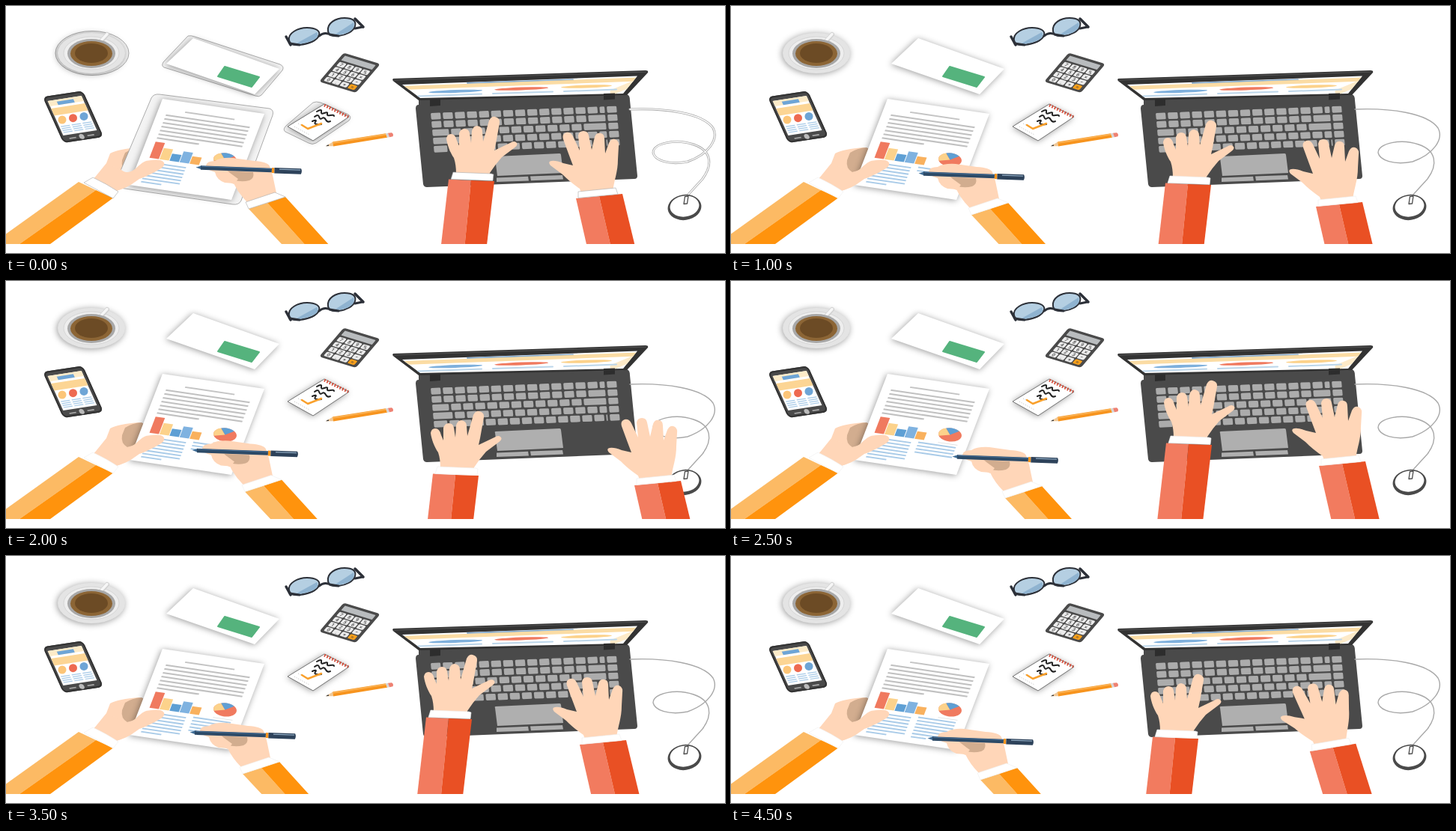
An HTML page that plays this animation: 960 px wide and 330 px high, repeating every 5000 ms.

```html
<!DOCTYPE html>
<html lang="en">
<head>
<meta charset="utf-8">
<title>Desk work</title>
<style>
html, body { margin: 0; width: 100%; height: 100%; overflow: hidden; background: #fff; }
svg { display: block; width: 960px; height: 330px; }
.skin { fill: #ffd6b8; }
.shade { fill: #d2ad8f; }
.cuff { fill: #fff; stroke: #eee; stroke-width: .6; }
.orange { fill: #ff930d; }
.peach { fill: #fcba64; }
.red { fill: #e95024; }
.coral { fill: #f27b5f; }
.shadow { filter: drop-shadow(-1px 1px 4px #0006); }
.halo { display: none; fill: #f3f3f3; stroke: #999; stroke-width: .8; stroke-linejoin: round; }
.core { display: none; }
.rough .halo, .rough .core { display: inline; }
.rough .cuff { stroke: #aaa; }
.rough .cable { stroke-width: 3; }
.line { fill: none; stroke-linecap: round; stroke-linejoin: round; }
text { font: 500 6.5px Roboto, Arial, sans-serif; fill: #444; text-anchor: middle; }
</style>
</head>
<body>
<svg id="stage" viewBox="0 0 960 330">
  <defs>
    <clipPath id="screen"><path d="M529 105 843 93.5 824 117 553 123Z"/></clipPath>
    <path id="cable" d="M833 138C880 136 930 143 944 163 952 178 938 198 910 208 885 213 866 206 864 196 864 183 895 177 918 185 942 193 944 212 930 231L909 254"/>
  </defs>

  <g id="coffee">
    <ellipse class="halo" cx="115" cy="63" rx="49" ry="29.5"/>
    <g class="shadow">
      <ellipse cx="114" cy="63" rx="45" ry="27" fill="#e4e4e4"/>
    </g>
    <ellipse cx="114" cy="63" rx="37" ry="22" fill="#eee" stroke="#d6d6d6"/>
    <path class="line" d="M127 47 135 38" stroke="#d2d2d2" stroke-width="6"/>
    <path class="line" d="M127 46 135 37.5" stroke="#f6f6f6" stroke-width="3.5"/>
    <ellipse cx="114" cy="63.5" rx="32" ry="19.5" fill="#a8a8a8"/>
    <ellipse cx="114" cy="63.5" rx="28" ry="16.5" fill="#8c6535"/>
    <ellipse cx="114" cy="63" rx="22" ry="13" fill="#6c4b25"/>
  </g>

  <g id="phone" transform="matrix(1 -.154 .45 1 49 121.5)">
    <rect width="53.5" height="61.5" rx="6" fill="#4a4a4a"/>
    <rect x="1" y="1" width="51.5" height="59.5" rx="5" fill="none" stroke="#333" stroke-width="2"/>
    <rect x="4" y="6" width="45" height="46" fill="#fff"/>
    <path d="M4 6h45v7h-45z" fill="#fdebc8"/>
    <path d="M15 8.5h22v4.5h-22z" fill="#6ea5d6"/>
    <path d="M4 16h45v9.5h-45z" fill="#fcd594"/>
    <circle cx="26.5" cy="57" r="3.3" fill="#bbb"/>
    <path d="M10 57h9M34 57h9" stroke="#aaa" stroke-width="1.6"/>
  </g>
  <g id="phone-dots"/>

  <g id="envelope">
    <path class="halo" d="M243 40Q247 39 252 41L366 78Q372 81 369 86L341 119Q338 122 333 120L211 82Q207 80 210 75Z"/>
    <path class="shadow" d="M250 43 365 84 332 118 214 77Z" fill="#fff"/>
    <path d="M292 81 338 95 328 108 283 94Z" fill="#55b37d" stroke="#55b37d" stroke-width="2" stroke-linejoin="round"/>
  </g>

  <g id="glasses" stroke="#2c3038">
    <path class="line" d="M374 41 380 52M466 17 477 28" stroke-width="3.5"/>
    <path d="M378 46C376 36 390 29 402 29 413 29 420 33 418 39 416 46 404 51 392 52 383 53 379 51 378 46Z" fill="#b5cfe2" stroke-width="2"/>
    <path d="M430 34C428 23 440 16 452 16 463 16 468 20 466 27 464 34 454 39 444 40 435 41 431 39 430 34Z" fill="#b5cfe2" stroke-width="2"/>
    <path d="M386 51 415 35Q420 43 404 48 394 51 386 51ZM437 39.500 464 22Q467 31 455 36 446 39 437 39.500Z" fill="#8fb3d0" stroke="none"/>
    <path class="line" d="M418 40Q424 35 430 37M379 50 392 52M432 38 444 40M466 30 476 28" stroke-width="3"/>
  </g>

  <g id="calculator" transform="matrix(.98 .3 -.66 .77 451 62.5)">
    <rect width="50" height="50" rx="4" fill="#4a4a4a"/>
    <rect x="4" y="3.5" width="42" height="8" rx="1" fill="#b9bcbe"/>
  </g>

  <g id="notepad">
    <path class="halo" d="M410 129Q414 127 420 129L457 145Q462 148 458 153L414 183Q409 186 404 183L373 168Q369 165 374 160Z"/>
    <path class="shadow" d="M425 131 458 148 410 180 376 161Z" fill="#fff"/>
    <path d="M425 131 458 148 410 180 376 161Z" fill="none" stroke="#555" stroke-width=".8"/>
    <path d="M425 132.500 457 148" stroke="#d6503c" stroke-width="4" stroke-dasharray="1.8 2"/>
    <path class="line" d="M415 141Q422 137 421 141T425 143 429 144 433 146 438 147M412 148Q417 144 418 148T422 150 427 152 433 154M409 154Q416 151 413 155T421 158" stroke="#222" stroke-width="2"/>
    <path class="line" d="M395 159 403 164 421 157" stroke="#f9a02c" stroke-width="2.5"/>
    <path d="M385 161 405 172M390 157 394 159" stroke="#bbb" stroke-dasharray="1 2"/>
  </g>

  <g id="pencil" transform="translate(0 -.7)">
    <path d="M427 188 436 182.5 437 188Z" fill="#efc99a"/>
    <path d="M427 188 430.5 185.8 431 187.6Z" fill="#333"/>
    <path d="M436 182.3 507 171 509 176.5 437 188.2Z" fill="#f7941e"/>
    <path d="M436 183.6 507 172.2" stroke="#fbb65b" stroke-width="1.5"/>
    <path d="M507 171 510 170.5 512 176 509 176.5Z" fill="#d5d5d5"/>
    <path d="M510 170.5 515 170Q518 172 516.5 175L512 176Z" fill="#ee8172"/>
  </g>

  <g id="laptop">
    <path d="M551 125 829 118Q833 119 833 126L843 227Q843 231 839 231L562 242Q558 242 557 238L547 137Q547 132 551 132Z" fill="#4a4a4a"/>
    <path d="M517 97Q515 99 518 101L551 126 829 119 857 89Q858 86 854 86Z" fill="#333"/>
    <path d="M518 99 855 88" stroke="#555"/>
    <g clip-path="url(#screen)" class="line">
      <path d="M520 90h340v40h-340z" fill="#fff"/>
      <path d="M616 103 757 98.5" stroke="#80a9d0" stroke-width="2"/>
      <path d="M530 109.5 846 98" stroke="#fbdca4" stroke-width="5"/>
      <path d="M810 115 846 100" stroke="#fdeac8" stroke-width="7"/>
      <path d="M550 120.5 635 117.5M650 117 730 114.5M745 114 815 111.5" stroke="#bcd6ea" stroke-width="2"/>
      <ellipse cx="600" cy="114" rx="36" ry="2" fill="#7fb0dc" transform="rotate(-2 600 114)"/>
      <ellipse cx="688" cy="110.5" rx="36" ry="2" fill="#f07a5f" transform="rotate(-2 688 110.5)"/>
      <ellipse cx="775" cy="107.5" rx="34" ry="2" fill="#fcd28b" transform="rotate(-2 775 107.5)"/>
    </g>
    <path d="M566 125 580 124.5 580 133 566 134ZM798 117 813 116.5 813 124.5 798 125.5Z" fill="#2d2d2d"/>
    <g id="keys" transform="matrix(1 -.038 .09 1 567 143)" fill="#acacac"/>
    <path d="M654 201 739 197Q741 197 741 199L744 223 656 227 653 203Q652 201 654 201ZM655 229.5 697 227.8 698 233.5 655 235ZM700 227.6 743 226 744 231.5 701 233.3Z" fill="#afafaf"/>
  </g>

  <g id="mouse" class="line">
    <use href="#cable" class="cable" stroke="#a9a9a9" stroke-width="1.4"/>
    <use href="#cable" class="core" stroke="#fff" stroke-width="1.3"/>
    <ellipse cx="906" cy="269" rx="22.5" ry="17" fill="#4a4a4a" transform="rotate(-8 906 269)"/>
    <ellipse cx="906" cy="267.5" rx="19.5" ry="14" fill="#fff" transform="rotate(-8 906 267.5)"/>
    <path d="M906.5 254.5 911 254 909.5 264 905 264.5Z" stroke="#4a4a4a" stroke-width="1.3"/>
  </g>

  <g id="holding-fingers">
    <path class="skin" d="M117 231 134 210 139 197Q150 191 178 189L186 192 172 230 148 247Z"/>
    <path class="shade" d="M155 206 159 196Q168 190 181 189L186 192 174 218 162 222Q153 217 155 206Z"/>
  </g>

  <path class="halo" d="M194 123Q197 117 205 118L352 137Q358 139 356 146L314 260Q311 266 303 265L152 243Q144 241 147 234Z"/>
  <path class="shadow" d="M209 124 345 144 301 259 164.5 239Z" fill="#fff"/>
  <g id="page" transform="matrix(1 .147 -.383 1 209 124)">
    <path d="M35 12.7h66" stroke="#c4c4c4" stroke-width="1.8"/>
  </g>
  <g id="pie" transform="translate(292.5 205.5) rotate(6) scale(15.5 9)">
    <circle r="1" fill="#f07a5f"/>
    <path d="M0 0-.95 .3A1 1 0 0 1-.4-.92Z" fill="#fcd28b"/>
    <path d="M0 0-.4-.92A1 1 0 0 1 .75-.66Z" fill="#5e9fd4"/>
  </g>

  <g id="holding-arm">
    <path class="peach" d="M97 235 120 246 18 318 0 318 0 304.5Z"/>
    <path class="orange" d="M120 246 143 256.5 59 318 18 318Z"/>
    <path class="skin" d="M117 231 135 212 152 217C158 224 165 223 172 218 180 211 184 207 190 206.5Q206 204 210 208 214 212 207 217C200 221 190 227 178 231 170 237 160 244 147 247Z"/>
    <path class="cuff" d="M116 229Q135 238 150 248L143 257 104 236Z"/>
  </g>

  <g id="writer">
    <path class="peach" d="M321 279 346 271 408 340 378 340Z"/>
    <path class="orange" d="M346 271 370 263 440 340 408 340Z"/>
    <path class="skin" d="M264 221Q265 215 276 215 284 210 300 211L328 215Q346 216 349 222L353 234 358 258 319 270Q307 258 301 245L289 244Q278 240 276 230 264 227 264 221Z"/>
    <path class="shade" d="M288 228 327 230Q329 238 322 241 310 244 301 240Z"/>
    <path class="skin" d="M275 223 286 222Q295 231 307 239L301 246 287 239Q276 231 275 223Z"/>
    <path class="cuff" d="M317 270 356 257 370 263 321 279Z"/>
    <g transform="translate(248 223.5) rotate(2.1)">
      <path d="M2.5 0 10-2.5V2.5Z" fill="#3f6d96"/>
      <path d="M9-2.5H104V3H9Z" fill="#2c4a67"/>
      <path d="M10-1.5H104" stroke="#4a7299"/>
      <path d="M104-3.2h3.5v7h-3.5z" fill="#f7941e"/>
      <path d="M107.5-3.5H143Q145 0 143 4H107.5Z" fill="#2d425a"/>
      <path d="M114-1.5H142" stroke="#8fa9c0" stroke-width="1.2"/>
    </g>
  </g>

  <g id="left-hand">
    <path class="coral" d="M591 231.5 621 233 610 345 578 345Z"/>
    <path class="red" d="M621 233 652 234 639 345 610 345Z"/>
    <path class="skin" d="M601 224Q601 212 598 203C593 196 589 185 588 177Q589 171 594 171 600 171 602 180L605 187 605 170Q607 164 612 164 618 164 619 170L621 183 622 167Q624 160 629 160 636 161 636 168L637 181 645 153Q648 147 653 148 660 150 659 156L654 184 652 193 673 183Q679 179 682 183 684 186 678 190L662 202Q653 212 646 223L645 230Z"/>
    <path class="cuff" d="M597 222 648 224 651 225 650 233.5 594 231.5Z"/>
  </g>

  <g id="right-hand">
    <path class="coral" d="M761 257 792 254 820 375 788 375Z"/>
    <path class="red" d="M792 254 823 251 853 375 820 375Z"/>
    <path class="skin" d="M768 250 766 244C757 238 749 231 743 225L727 213Q723 208 728 207 734 206 744 210L757 213Q752 200 744 178 742 171 748 169 754 168 757 174L766 193 764 173Q765 167 771 167 777 167 778 173L782 192 786 175Q788 169 794 170 799 171 799 177L800 197 805 183Q808 177 813 178 819 180 818 187L817 205C817 222 812 232 810 248Z"/>
    <path class="cuff" d="M764 248 814 243 817 251.5 764 256.5Z"/>
  </g>

  <path d="M0 318h960v12H0z" fill="#fff"/>
</svg>
<script>
const $ = id => document.getElementById(id);

function add(parent, tag, attrs, label) {
  const node = document.createElementNS("http://www.w3.org/2000/svg", tag);
  for (const name in attrs) node.setAttribute(name, attrs[name]);
  if (label) node.textContent = label;
  parent.append(node);
  return node;
}
const rect = (parent, x, y, width, height, fill, rx = 0) =>
  add(parent, "rect", { x, y, width, height, rx, ...(fill && { fill }) });

// Phone: three coloured dots with text lines below
["#fcc578", "#ee6a50", "#6ea5d6"].forEach((color, i) => {
  add($("phone-dots"), "circle", { cx: 75 + i * 14.5, cy: 152 - i * 2.3, r: 5.5, fill: color });
  for (let y = 40; y < 50; y += 2.6) rect($("phone"), 6 + i * 14.5, y, 12, 1.2, "#a9cbe8");
});

// Calculator buttons
[..."789%456×123−0.+="].forEach((label, i) => {
  const x = 4 + i % 4 * 10.8, y = 14 + Math.floor(i / 4) * 8.6;
  rect($("calculator"), x, y, 9.4, 7.2, label === "=" ? "#f9a01b" : "#ececec", 1.5);
  add($("calculator"), "text", { x: x + 4.7, y: y + 5.9 }, label);
});

// Keyboard: a lead key per row, equal keys, then a wide key or the last column
[13, 13, 22, 26, 18].forEach((lead, row) => {
  const y = row * 11, wide = row === 1 || row === 2;
  const key = (x, width) => rect($("keys"), x, y, width, 8.7, null, 1.5);
  key(0, lead);
  let x = lead + 3;
  for (; x + 13 < (wide ? 208 : 234); x += 16.1) key(x, 13.2);
  if (x < 232) key(x, 232 - x);
  key(235, 13);
});

// Page contents
const page = $("page");
for (let i = 0; i < 7; i++) {
  rect(page, 12, 19 + i * 5.1, i < 6 ? 112 : 56, 2, "#c1c1c1");
  rect(page, 13, 82 + i * 4.3, i < 6 ? 50 : 27, 1.8, "#a9cbe8");
}
[["#f07a5f", 55.5], ["#fcd28b", 62], ["#5e9fd4", 67.5], ["#7fb2e0", 62.5], ["#f9b15e", 67]]
  .forEach(([color, top], i) => rect(page, 12 + i * 13.4, top, 12.5, 77 - top, color));
rect(page, 97, 77, 26, .7, "#ddd");
const written = Array.from({ length: 7 }, (_, i) => rect(page, 72, 80 + i * 4.3, 50, 1.8, "#a9cbe8"));

// Per step: writing hand x, y; left hand x, y; right hand x, y, turn; rows written
const poses = [
  [3, -8, 0, 0, 0, 0, 0, 0],
  [51, 1, 12, 3, 8, -4, 0, 2],
  [0, 0, -11, 5, 20, 11, 0, 2],
  [48, 6, 24, 5, -1, -17, 0, 3],
  [-2, 2.5, -21, 26, 78, 16, 0, 3],
  [45, 11, -10, -15, 24, -10, 0, 4],
  [42, 16, -12, 12, -8, -10, 0, 5],
  [-5, 12, -30, -16, 5, -5, 0, 5],
  [40, 20, -56, -4, -39, -30, -15, 6],
  [12, 20, -28, 10, 11, 2, -4, 6.4]
];
const STEP = 500;
let shown = -1;

function show(step) {
  const [wx, wy, lx, ly, rx, ry, turn, rows] = poses[step];
  $("writer").setAttribute("transform", `translate(${wx} ${wy})`);
  $("left-hand").setAttribute("transform", `translate(${lx} ${ly})`);
  $("right-hand").setAttribute("transform", `translate(${rx} ${ry}) rotate(${turn} 790 246)`);
  written.forEach((line, i) => line.setAttribute("width", 50 * Math.max(0, Math.min(1, rows - i))));
  $("stage").classList.toggle("rough", step === 0);
}

const start = performance.now();
function tick() {
  const step = Math.floor((performance.now() - start) / STEP) % poses.length;
  if (step !== shown) show(shown = step);
  requestAnimationFrame(tick);
}
tick();
</script>
</body>
</html>
```
